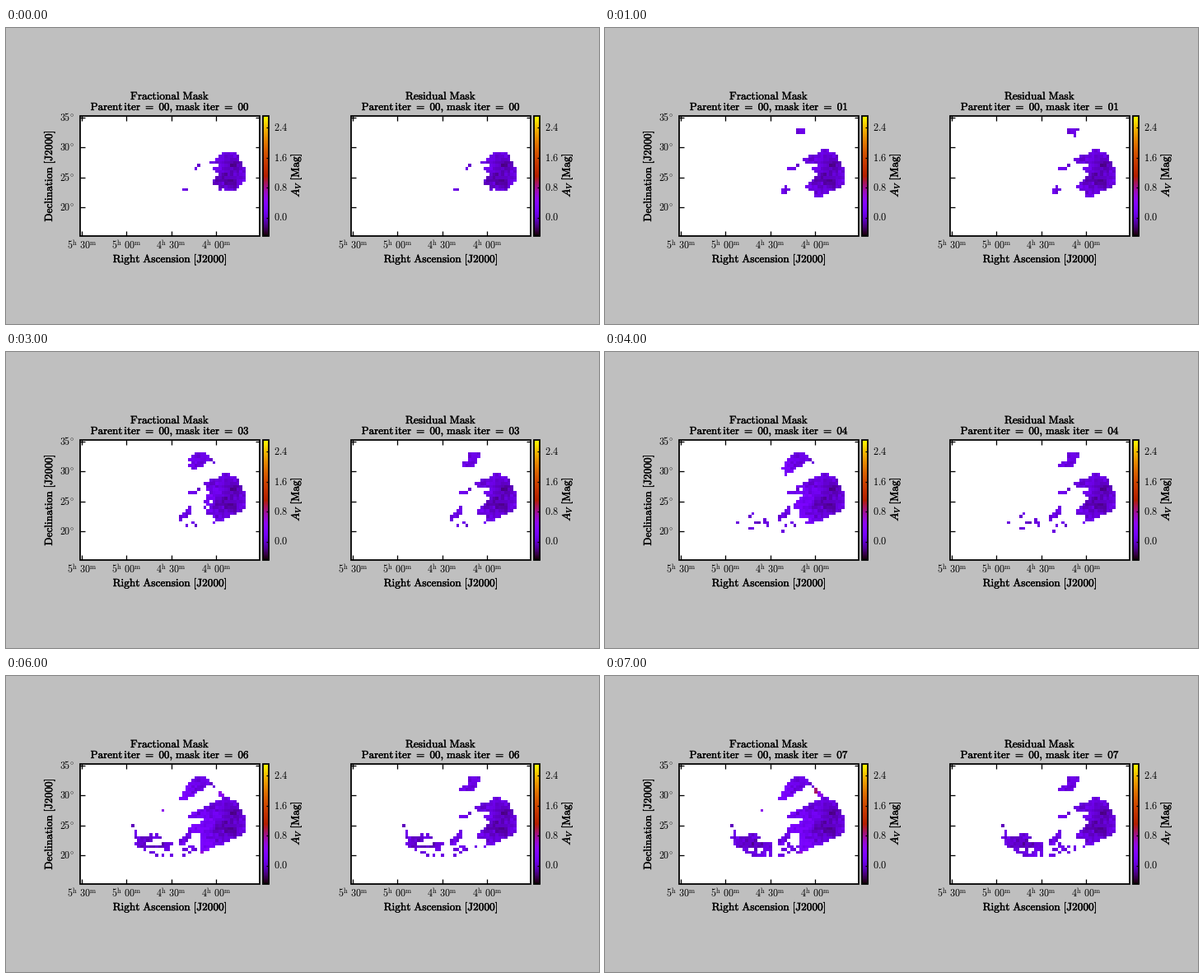
Recreate the animation shown at these times as a matplotlib script. Size 720 by 360 pixels, loop 8 s.

```python
import numpy as np
import matplotlib.pyplot as plt
from matplotlib.animation import FuncAnimation
from matplotlib.patches import Rectangle
from matplotlib.path import Path
from matplotlib.patheffects import withStroke

W, H, DPI = 720, 360, 100
PT = 72 / DPI
ROWS, COLS = 40, 60
TOP, PANEL_W, PANEL_H = 107, 218.4, 145.6
STEPS, NEVER = 8, 99
VMIN, VMAX = -0.49, 2.71

plt.rcParams["mathtext.fontset"] = "cm"
rng = np.random.default_rng(4)
Y, X = np.mgrid[:ROWS, :COLS]
CELLS = np.column_stack([X.ravel(), Y.ravel()])


def clumps():
    """Uniform noise whose horizontal neighbours are alike."""
    u = rng.random((ROWS, COLS))
    mixed = u + 0.6 * np.roll(u, 1, axis=1)
    return mixed.ravel().argsort().argsort().reshape(ROWS, COLS) / mixed.size


def grow(masks, outline, seed, start, rate, jitter):
    """Fill an outline outwards from a seed; the masks hold each cell's first step."""
    inside = Path(outline).contains_points(CELLS).reshape(ROWS, COLS)
    dist = np.hypot(X - seed[0], Y - seed[1])
    step = np.maximum(0, np.round(start + rate * dist + jitter * clumps()))
    for mask in masks:
        mask[inside] = np.minimum(mask, step)[inside]


def make_births():
    fraction, residual = both = np.full((2, ROWS, COLS), float(NEVER))
    # main cloud
    grow(both, [(47.6, 10.6), (49, 10.6), (52.5, 13), (54.6, 17.5), (54.6, 22.4),
                (50.4, 24.6), (43.6, 27.5), (45, 25.2), (40.6, 23.6), (44, 20.6),
                (46, 18.6), (43.5, 17.2), (46.5, 15), (42, 15.5), (40.6, 13.8),
                (44, 12.6)], (48.8, 18), -2.3, 0.4, 0.4)
    # streak beside it
    grow(both, [(34.6, 17.4), (35.5, 16.6), (38, 16.5), (39, 15.6), (40.4, 15.6),
                (38.4, 17.4)], (39, 16), 0, 0.3, 0)
    # small clump
    grow(both, [(32.6, 25.5), (35.5, 21.6), (36.4, 21.6), (36.4, 24.4), (35.3, 25.5)],
         (34.5, 24), -0.5, 1.3, 0)
    # lower arm
    grow(both, [(16.6, 19.5), (18.6, 19.5), (19, 23.5), (25, 22.5), (27, 25.4),
                (30.5, 25.6), (30.5, 30.5), (24.5, 30.5), (18.5, 27), (16.6, 24.5)],
         (25, 27), 3, 0.2, 4.4)
    # loose cells between arm and cloud
    grow(both, [(32.5, 25.6), (36.5, 25.6), (41.5, 26.6), (41, 28.5), (36.5, 30.5),
                (32.5, 30.5)], (36, 28), 3, 0, 9)
    # upper filament
    grow([residual], [(38.5, 3.5), (42.4, 3.5), (42.4, 5.4), (40, 8.4), (35.6, 8.4),
                      (36.5, 6.5), (39, 6)], (40.5, 4.5), 0.6, 0.45, 0.6)
    grow([fraction], [(37.6, 3.5), (41.6, 3.5), (44.4, 7.4), (42, 6.6), (39.5, 8.4),
                      (36.5, 10.5), (35, 11.5), (32.6, 11.5), (35, 6.3)],
         (40.5, 4.5), 0.6, 0.45, 0.6)
    # cloud spreading left, and the ridge above it
    grow([fraction], [(47, 11), (41, 13.4), (34.5, 17.4), (40.5, 17.5), (40.5, 18.6),
                      (35, 20.6), (36, 22.5), (39.5, 23), (39.5, 29.5), (46, 26),
                      (47, 18)], (46, 19), 1.6, 0.28, 1.2)
    grow([fraction], [(43.5, 6.6), (45.5, 7.5), (48.6, 11.4), (46.5, 11.4)],
         (47, 11), 4.6, 0.4, 1.2)
    # stray cells
    grow([fraction], [(26, 8), (32, 8), (32, 19), (26, 19)], (29, 13), 5, 0, 60)
    return fraction, residual


def blob(cx, cy, sx, sy):
    return np.exp(-((X - cx) / sx) ** 2 - ((Y - cy) / sy) ** 2)


def make_values(fraction, residual):
    dense = blob(50.5, 15.5, 3, 2.2) + blob(48.5, 21, 4, 2.5) + 0.7 * blob(23, 26, 5, 2)
    base = 0.09 - 0.24 * dense + rng.normal(0, 0.06, (ROWS, COLS))
    heat = np.interp(fraction, [2, 5, 6, 7], [0, 0.2, 0.4, 0.8])
    return base + np.where(fraction < residual, heat, 0), base


def label(x, y, text, size, **kw):
    kw = {"ha": "center", "va": "baseline"} | kw
    return ax.text(x, y, f"${text}$", fontsize=size * PT, **kw)


def heavy(x, y, text, size=13.3, **kw):
    stroke = withStroke(linewidth=0.35 * PT, foreground="black")
    return label(x, y, text, size, path_effects=[stroke], **kw)


def upright(x, y, text):
    return heavy(x, y, text, rotation=90, va="center")


def line(x0, y0, x1, y1):
    ax.plot([x0, x1], [y0, y1], color="black", lw=1.3 * PT, zorder=4,
            solid_capstyle="butt")


def frame(x, width):
    ax.add_patch(Rectangle((x, TOP), width, PANEL_H, fill=False, ec="black",
                           lw=1.8 * PT, zorder=5))


def show(data, x, width):
    return ax.imshow(data, cmap=cmap, vmin=VMIN, vmax=VMAX, aspect="auto", zorder=2,
                     extent=(x, x + width, TOP + PANEL_H, TOP),
                     interpolation="nearest")


def rm(text):
    return r"\mathrm{" + text.replace(" ", r"\ ") + "}"


def iter_title(step):
    parent = rm("Parent") + r"\," + rm("iter")
    return rf"{parent}\ {{=}}\ 00{{,}}\ {rm('mask iter')}\ {{=}}\ {step:02d}"


def draw_panel(x, name, with_y):
    right, bottom, mid = x + PANEL_W, TOP + PANEL_H, x + PANEL_W / 2
    image = show(np.zeros((ROWS, COLS)), x, PANEL_W)
    frame(x, PANEL_W)
    for i in range(4):
        tx, ty = x + 2 + 54.4 * i, 109 + 36.4 * i
        line(tx, TOP, tx, TOP + 5.5)
        line(tx, bottom, tx, bottom - 5.5)
        line(x, ty, x + 5.5, ty)
        line(right, ty, right - 5.5, ty)
        hour, minute = divmod(330 - 30 * i, 60)
        label(tx, 269, rf"{hour}^{{\mathrm{{h}}}}\ {minute:02d}^{{\mathrm{{m}}}}", 12)
        if with_y:
            label(83, ty + 4, rf"{35 - 5 * i}^{{\circ}}", 12, ha="right")
    heavy(mid, 285, rm("Right Ascension [J2000]"))
    heavy(mid, 87, rm(name))
    title = heavy(mid, 100, "0", 13.1)

    bar, bar_w = x + 222, 7.3
    show(np.linspace(VMAX, VMIN, 256)[:, None], bar, bar_w)
    frame(bar, bar_w)
    for i in range(4):
        ty = 121.3 + 36.4 * i
        line(bar + 3.5, ty, bar + bar_w, ty)
        label(bar + 13, ty + 4, f"{0.8 * (3 - i):.1f}", 12.3, ha="left")
    upright(x + 262.5, 179, r"A_{V}\ " + rm("[Mag]"))
    return image, title


fig = plt.figure(figsize=(W / DPI, H / DPI), dpi=DPI, facecolor="#bfbfbf")
ax = fig.add_axes([0, 0, 1, 1])
cmap = plt.get_cmap("gnuplot").copy()
cmap.set_bad("white")

births = make_births()
values = make_values(*births)
panels = [draw_panel(90, "Fractional Mask", True),
          draw_panel(419, "Residual Mask", False)]
upright(53, 180, rm("Declination [J2000]"))
ax.set(xlim=(0, W), ylim=(H, 0))
ax.axis("off")


def update(step):
    for (image, title), birth, value in zip(panels, births, values):
        image.set_data(np.ma.masked_where(birth > step, value))
        title.set_text(f"${iter_title(step)}$")
    return [artist for panel in panels for artist in panel]


anim = FuncAnimation(fig, update, frames=STEPS, interval=1000, repeat=True)
plt.show()
```
